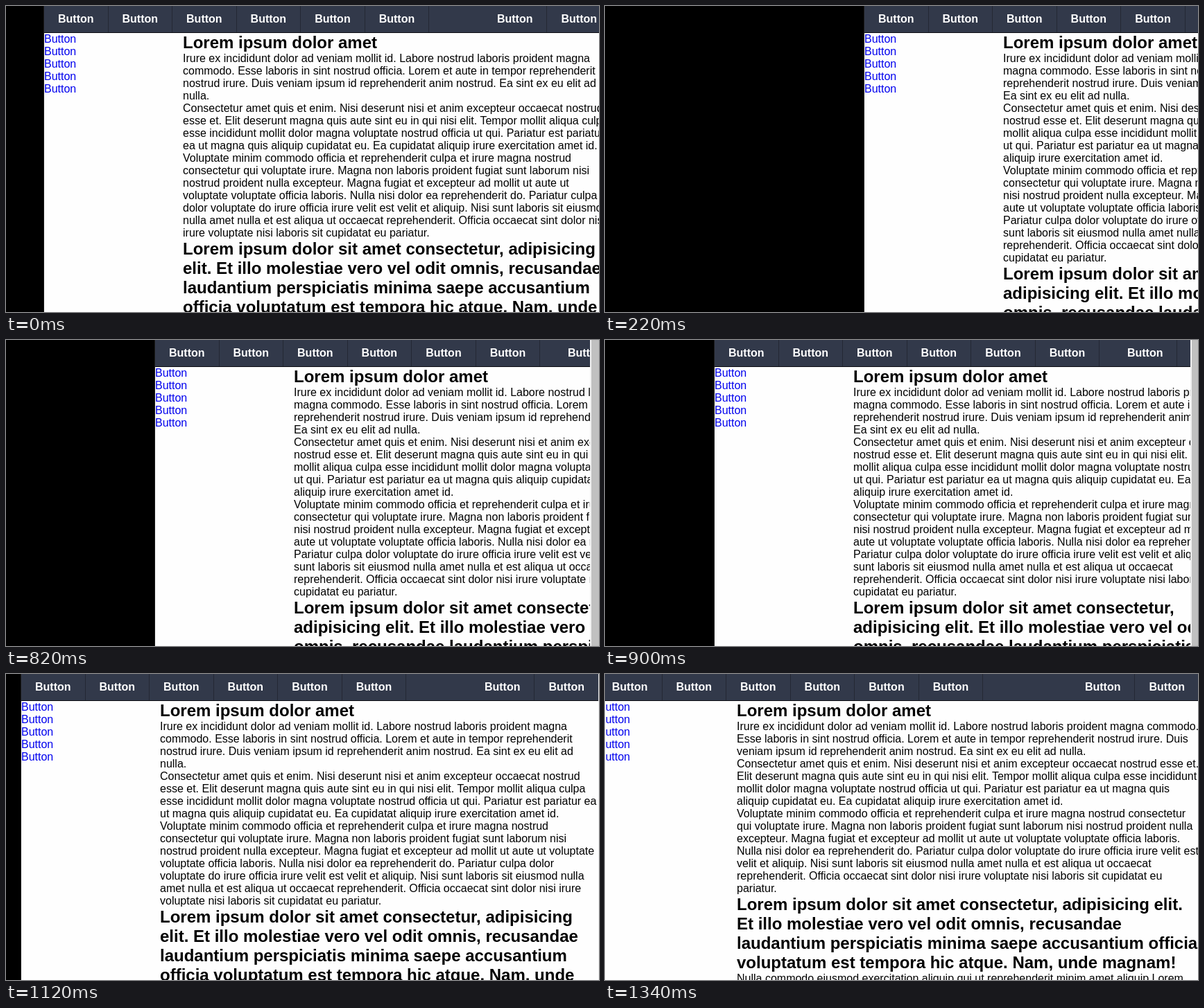
An HTML page for the animation above (1570 ms loop, 855 by 442 pixels).

```html
<!DOCTYPE html>
<html lang="en">
<head>
<meta charset="utf-8">
<title>Resizing page</title>
<style>
  * { margin: 0; padding: 0; box-sizing: border-box; }
  html, body { width: 100%; height: 100%; overflow: hidden; background: #000; }
  body { position: relative; font: 16px/18px "Liberation Sans", Arial, sans-serif; color: #000; }
  #page {
    position: absolute; top: 0; left: 0; height: 442px;
    background: #fefefe; box-shadow: -1px 0 #1c1c1c;
  }
  nav {
    display: flex; justify-content: space-between; height: 39px;
    background: #32394a; border-bottom: 1px solid #0c0d12;
  }
  nav div { display: flex; }
  nav span {
    padding: 0 20px; border-right: 1px solid #242834;
    font-weight: bold; line-height: 38px; color: #fff;
  }
  aside { position: absolute; left: 0; top: 39px; width: 200px; color: #00e; }
  aside span { display: block; }
  main { margin-left: 200px; }
  h2 { font-size: 24px; line-height: 28px; }
  #edge {
    position: absolute; top: 0; right: 0; height: 442px;
    background: #c0c0c0; border-left: 2px solid #f0f0f0;
  }
</style>
</head>
<body>
<div id="page">
  <nav><div data-buttons="6"></div><div data-buttons="2"></div></nav>
  <aside data-buttons="5"></aside>
  <main>
    <h2>Lorem ipsum dolor amet</h2>
    <p>Irure ex incididunt dolor ad veniam mollit id. Labore nostrud laboris proident magna commodo. Esse laboris in sint nostrud officia. Lorem et aute in tempor reprehenderit nostrud irure. Duis veniam ipsum id reprehenderit anim nostrud. Ea sint ex eu elit ad nulla.</p>
    <p>Consectetur amet quis et enim. Nisi deserunt nisi et anim excepteur occaecat nostrud esse et. Elit deserunt magna quis aute sint eu in qui nisi elit. Tempor mollit aliqua culpa esse incididunt mollit dolor magna voluptate nostrud officia ut qui. Pariatur est pariatur ea ut magna quis aliquip cupidatat eu. Ea cupidatat aliquip irure exercitation amet id.</p>
    <p>Voluptate minim commodo officia et reprehenderit culpa et irure magna nostrud consectetur qui voluptate irure. Magna non laboris proident fugiat sunt laborum nisi nostrud proident nulla excepteur. Magna fugiat et excepteur ad mollit ut aute ut voluptate voluptate officia laboris. Nulla nisi dolor ea reprehenderit do. Pariatur culpa dolor voluptate do irure officia irure velit est velit et aliquip. Nisi sunt laboris sit eiusmod nulla amet nulla et est aliqua ut occaecat reprehenderit. Officia occaecat sint dolor nisi irure voluptate nisi laboris sit cupidatat eu pariatur.</p>
    <h2>Lorem ipsum dolor sit amet consectetur, adipisicing elit. Et illo molestiae vero vel odit omnis, recusandae laudantium perspiciatis minima saepe accusantium officia voluptatum est tempora hic atque. Nam, unde magnam!</h2>
    <p>Nulla commodo eiusmod exercitation aliquip qui ut reprehenderit minim amet aliquip Lorem</p>
  </main>
</div>
<div id="edge"></div>
<script>
  const LOOP = 1570, STAGE = 855, MIN_WIDTH = 760;

  // Drag positions: start time, page left, page width, right clip
  const steps = [
    [0, 55, 818, STAGE],
    [80, 187, MIN_WIDTH, STAGE],
    [150, 291, MIN_WIDTH, STAGE],
    [220, 374, MIN_WIDTH, STAGE],
    [670, 342, MIN_WIDTH, 839],
    [750, 276, MIN_WIDTH, 841],
    [820, 215, MIN_WIDTH, 842],
    [900, 158, MIN_WIDTH, 844],
    [970, 108, MIN_WIDTH, 847],
    [1050, 63, 792, 850],
    [1120, 22, 833, 854],
    [1190, 5, 850, STAGE],
    [1260, -4, 860, STAGE],
    [1340, -10, 867, STAGE]
  ];

  for (const group of document.querySelectorAll('[data-buttons]'))
    group.innerHTML = '<span>Button</span>'.repeat(group.dataset.buttons);

  const page = document.getElementById('page');
  const edge = document.getElementById('edge');
  let current;

  function draw(now) {
    const time = now % LOOP;
    const step = steps.filter(([start]) => start <= time).pop();
    if (step !== current) {
      const [, left, width, clip] = current = step;
      page.style.left = left + 'px';
      page.style.width = width + 'px';
      edge.style.left = clip + 'px';
      edge.style.display = clip < STAGE ? 'block' : 'none';
    }
  }

  const began = performance.now();
  function tick() {
    draw(performance.now() - began);
    requestAnimationFrame(tick);
  }
  tick();
</script>
</body>
</html>
```
